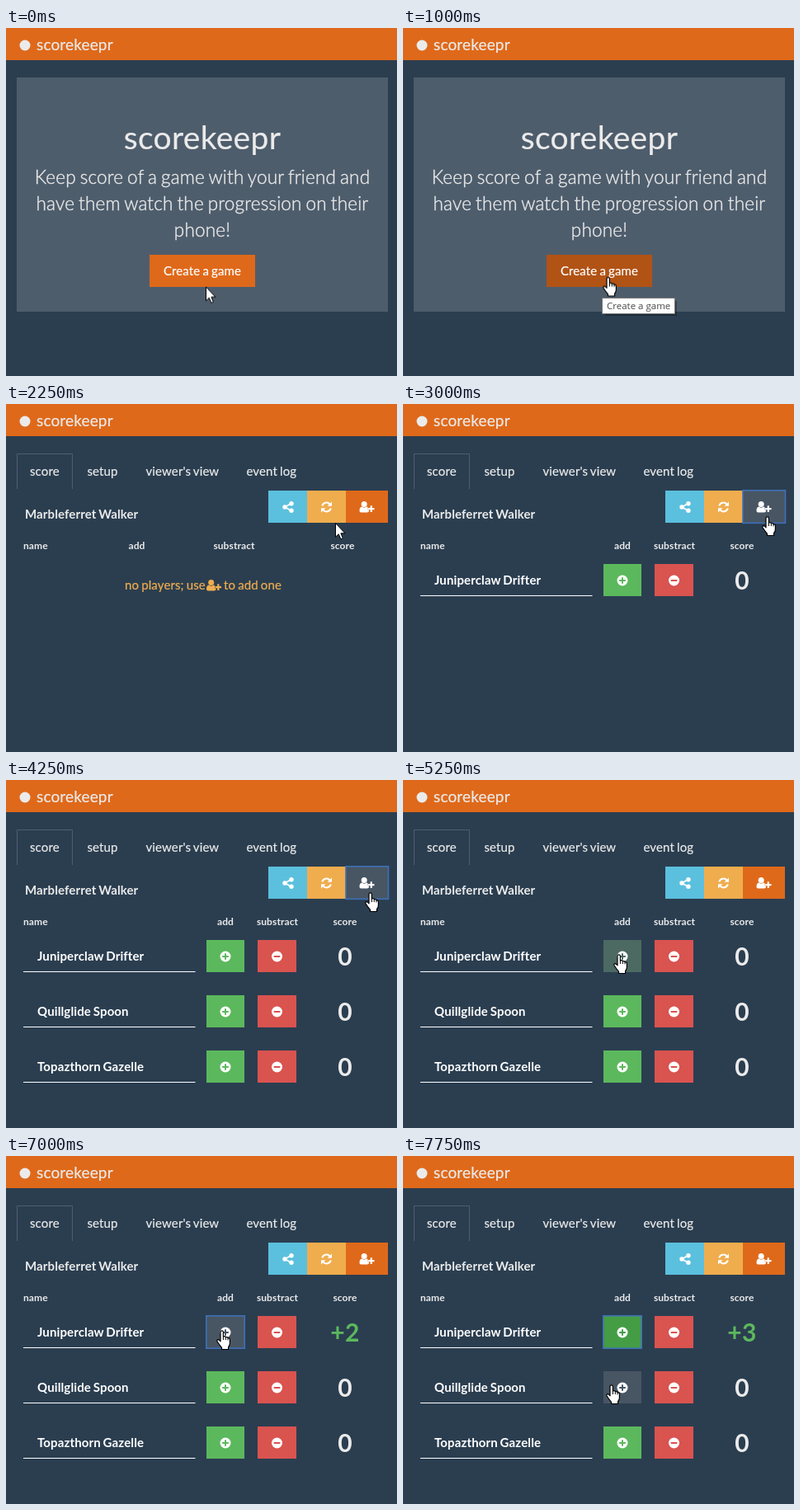
An HTML page that plays this animation: 474 px wide and 422 px high, repeating every 8000 ms.

```html
<!DOCTYPE html>
<html lang="en">
<head>
<meta charset="utf-8">
<title>scorekeepr</title>
<style>
  html, body { margin: 0; width: 100%; height: 100%; overflow: hidden; background: #2b3e50; }
  svg { display: block; width: 474px; height: 422px; font: 15px Lato, sans-serif; }
  text {
    fill: #ebebeb; stroke: #ebebeb; stroke-width: .2;
    letter-spacing: .008em; word-spacing: -.06em; white-space: pre;
  }
  .mid { text-anchor: middle; }
  .bold { font-weight: 700; stroke: none; }
  .head { font-size: 12px; font-weight: 700; stroke: none; }
  .score { font-size: 30px; font-weight: 700; text-anchor: middle; stroke: none; }
  .up { fill: #5cb85c; }
  .white { fill: #fff; }
  .create-text { fill: #fff; stroke: #fff; }
  .lead { font-size: 22.5px; font-weight: 300; text-anchor: middle; stroke-width: .4; }
  .warn { fill: #f0ad4e; color: #f0ad4e; }
  text.warn { stroke: #f0ad4e; }
  .ring { fill: none; stroke: #3f70b8; stroke-width: 1.6; }
  .tip text { font: 11.5px "Open Sans", sans-serif; fill: #4a4a4a; stroke: none; letter-spacing: 0; word-spacing: 0; }

  /* Everything changes in hard steps on one shared 8 s clock. */
  .a { animation: 8s step-end infinite; }
  .home { animation-name: home; }
  .app { animation-name: app; }
  .create { fill: #df691a; animation-name: create; }
  .tip { animation-name: tip; }
  .empty { animation-name: empty; }
  .row1 { animation-name: row1; }
  .row2 { animation-name: row2; }
  .row3 { animation-name: row3; }
  .user { fill: #df691a; animation-name: user; }
  .user-ring { animation-name: user-ring; }
  .add { fill: #5cb85c; color: #5cb85c; }
  .add1 { animation-name: add1; }
  .add2 { animation-name: add2; }
  .add1-ring { animation-name: add1-ring; }
  .s0 { animation-name: s0; }
  .s1 { animation-name: s1; }
  .s2 { animation-name: s2; }
  .s3 { animation-name: s3; }
  .arrow { animation-name: arrow; }
  .hand { animation-name: hand; }

  @keyframes home { 0% { visibility: visible } 15.625% { visibility: hidden } }
  @keyframes app { 0% { visibility: hidden } 15.625% { visibility: visible } }
  @keyframes create { 0% { fill: #df691a } 3.125% { fill: #b15315 } }
  @keyframes tip {
    0% { opacity: 0 } 9.375% { opacity: .6 } 12.5% { opacity: 1 }
    15.625% { opacity: .17 } 18.75% { opacity: 0 }
  }
  @keyframes empty { 0% { opacity: 1 } 37.5% { opacity: 0 } }
  @keyframes row1 { 0% { opacity: 0 } 37.5% { opacity: 1 } }
  @keyframes row2 { 0% { opacity: 0 } 43.75% { opacity: 1 } }
  @keyframes row3 { 0% { opacity: 0 } 53.125% { opacity: 1 } }
  @keyframes user { 0% { fill: #df691a } 31.25% { fill: #485563 } 62.5% { fill: #df691a } }
  @keyframes user-ring { 0% { opacity: 0 } 37.5% { opacity: 1 } 62.5% { opacity: 0 } }
  @keyframes add1 {
    0% { fill: #5cb85c; color: #5cb85c }
    65.625% { fill: #4c6962; color: #4c6962 }
    68.75% { fill: #485563; color: #485563 }
    93.75% { fill: #449d44; color: #449d44 }
  }
  @keyframes add2 { 0% { fill: #5cb85c; color: #5cb85c } 96.875% { fill: #485563; color: #485563 } }
  @keyframes add1-ring { 0% { opacity: 0 } 75% { opacity: 1 } }
  @keyframes s0 { 0% { opacity: 1 } 75% { opacity: 0 } }
  @keyframes s1 { 0% { opacity: 0 } 75% { opacity: 1 } 81.25% { opacity: 0 } }
  @keyframes s2 { 0% { opacity: 0 } 81.25% { opacity: 1 } 90.625% { opacity: 0 } }
  @keyframes s3 { 0% { opacity: 0 } 90.625% { opacity: 1 } }
  @keyframes arrow {
    0% { opacity: 1; transform: translate(242px, 313.5px) }
    3.125% { opacity: 0; transform: none }
    18.75% { opacity: 1; transform: translate(243px, 305px) }
    21.875% { opacity: 1; transform: translate(256px, 256px) }
    25% { opacity: 1; transform: translate(369px, 192px) }
    28.125% { opacity: 1; transform: translate(399px, 144px) }
    31.25% { opacity: 0; transform: none }
    59.375% { opacity: 1; transform: translate(415px, 145px) }
    62.5% { opacity: 1; transform: translate(305px, 162px) }
    65.625% { opacity: 0; transform: none }
    93.75% { opacity: 1; transform: translate(252px, 242px) }
    96.875% { opacity: 0; transform: none }
  }
  @keyframes hand {
    0% { opacity: 0; transform: none }
    3.125% { opacity: 1; transform: translate(242px, 301.5px) }
    18.75% { opacity: 0; transform: none }
    31.25% { opacity: 1; transform: translate(435px, 136px) }
    59.375% { opacity: 0; transform: none }
    65.625% { opacity: 1; transform: translate(255px, 211px) }
    93.75% { opacity: 0; transform: none }
    96.875% { opacity: 1; transform: translate(246px, 277px) }
  }
</style>
</head>
<body>
<svg viewBox="0 0 474 422" xmlns="http://www.w3.org/2000/svg">
  <defs>
    <g id="user-plus">
      <circle cx="5.7" cy="3.6" r="3.5"/>
      <path d="M0 11.4C0 8.6 1 6.8 2.8 6.5Q5.7 8.8 8.6 6.5Q9.6 6.7 10.2 7.4V10.2H11.4V12.6Q10.8 13.4 9.6 13.4H2Q0 13.4 0 11.4Z"/>
      <path d="M13.2 5.2H15.4V8H18V10.2H15.4V13H13.2V10.2H10.6V8H13.2Z"/>
    </g>
    <g id="plus">
      <circle cx="266" cy="214" r="6.5" fill="#fff"/>
      <path d="M262.2 214H269.8M266 210.2V217.8" stroke="currentColor" stroke-width="2"/>
    </g>
    <g id="sub">
      <rect x="305" y="194" width="47" height="39" fill="#d9534f"/>
      <circle cx="328.5" cy="214" r="6.5" fill="#fff"/>
      <path d="M324.7 214H332.3" stroke="#d9534f" stroke-width="2"/>
      <path d="M21 232.5H229.5" stroke="#fff"/>
    </g>
    <g id="add-btn">
      <rect x="243" y="194" width="46" height="39"/>
      <use href="#plus"/>
    </g>
  </defs>

  <rect width="474" height="422" fill="#2b3e50"/>
  <rect width="474" height="39" fill="#df691a"/>
  <circle cx="23" cy="21" r="6.5" fill="#ebebeb"/>
  <text x="37" y="26.5" font-size="19">scorekeepr</text>

  <g class="a home">
    <rect x="13" y="60" width="450" height="284" fill="#4e5d6c"/>
    <text class="mid" x="238" y="147" font-size="39">scorekeepr</text>
    <text class="lead" x="238" y="189">Keep score of a game with your friend and</text>
    <text class="lead" x="238" y="221">have them watch the progression on their</text>
    <text class="lead" x="238" y="253">phone!</text>
    <rect class="a create" x="174" y="275" width="128" height="39"/>
    <text class="mid create-text" x="238" y="300">Create a game</text>
  </g>

  <g class="a app">
    <path d="M13.5 103V60.5H80.5V103" fill="none" stroke="#4e5d6c"/>
    <text x="29" y="87">score</text>
    <text x="98.5" y="87">setup</text>
    <text x="169.5" y="87">viewer's view</text>
    <text x="291.5" y="87">event log</text>
    <text class="bold" x="23" y="139">Marbleferret Walker</text>

    <rect x="318" y="105" width="47" height="39" fill="#5bc0de"/>
    <g fill="#fff">
      <path d="M346 120.5L338 125L346 129.5" fill="none" stroke="#fff" stroke-width="1.8"/>
      <circle cx="346" cy="120.8" r="2.7"/>
      <circle cx="338" cy="125" r="2.7"/>
      <circle cx="346" cy="129.2" r="2.7"/>
    </g>
    <rect x="365" y="105" width="47" height="39" fill="#f0ad4e"/>
    <g fill="#fff">
      <path d="M383.3 123.6A5.3 5.3 0 0 1 392.6 121.6M393.7 126.4A5.3 5.3 0 0 1 384.4 128.4" fill="none" stroke="#fff" stroke-width="2.1"/>
      <path d="M395 118.4V123.8H389.6ZM382 131.6V126.2H387.4Z"/>
    </g>
    <rect class="a user" x="412" y="105" width="51" height="39"/>
    <rect class="a ring user-ring" x="412" y="104.8" width="51.5" height="39.5"/>
    <use href="#user-plus" x="428.5" y="118" fill="#fff"/>

    <text class="head" x="21" y="176">name</text>
    <g class="a empty">
      <text class="head mid" x="158.5" y="176">add</text>
      <text class="head mid" x="276.5" y="176">substract</text>
      <text class="head mid" x="408" y="176">score</text>
      <text class="warn" x="144" y="225">no players; use</text>
      <use class="warn" href="#user-plus" x="243" y="213"/>
      <text class="warn" x="264" y="225">to add one</text>
    </g>

    <g class="a row1">
      <text class="head mid" x="266" y="176">add</text>
      <text class="head mid" x="329" y="176">substract</text>
      <text class="head mid" x="411" y="176">score</text>
      <use href="#sub"/>
      <text class="bold white" x="38" y="219">Juniperclaw Drifter</text>
      <use class="a add add1" href="#add-btn"/>
      <rect class="a ring add1-ring" x="242.8" y="193.8" width="46.4" height="39.4"/>
      <text class="a score s0" x="411" y="225">0</text>
      <text class="a score up s1" x="411" y="225">+1</text>
      <text class="a score up s2" x="411" y="225">+2</text>
      <text class="a score up s3" x="411" y="225">+3</text>
    </g>
    <g class="a row2" transform="translate(0 67)">
      <use href="#sub"/>
      <text class="bold white" x="38" y="219">Quillglide Spoon</text>
      <use class="a add add2" href="#add-btn"/>
      <text class="score" x="411" y="225">0</text>
    </g>
    <g class="a row3" transform="translate(0 134)">
      <use href="#sub"/>
      <text class="bold white" x="38" y="219">Topazthorn Gazelle</text>
      <use class="add" href="#add-btn"/>
      <text class="score" x="411" y="225">0</text>
    </g>
  </g>

  <g class="a tip">
    <rect x="245" y="331" width="87" height="18" fill="#000" opacity=".3"/>
    <rect x="241.5" y="327.5" width="88" height="19" fill="#fff" stroke="#767676"/>
    <text x="247" y="341">Create a game</text>
  </g>

  <g stroke="#000" fill="#fff" stroke-linejoin="round">
    <path class="a arrow" d="M.5 .5V17.3L4.2 13.7L6.9 19.8L9.4 18.7L6.9 12.8H12Z"/>
    <g class="a hand">
      <path stroke-width="1.2" d="M5 2.5A1.7 1.7 0 0 1 8.4 2.5V8C9.4 7.3 11 7.6 11.3 8.7C12.3 8.2 13.6 8.6 14 9.7C15.2 9.4 16.4 10.1 16.4 11.5V16C16.4 18 15.6 19.5 14.6 20.7V23.5H6.5V21.3C5 19.5 2.5 16.5 1 13.8C.3 12 2 11 3.4 12.2L5 13.8Z"/>
      <path fill="none" d="M8.4 8V12M11.3 8.7V12M14 9.7V12.4"/>
    </g>
  </g>
</svg>
</body>
</html>
```
